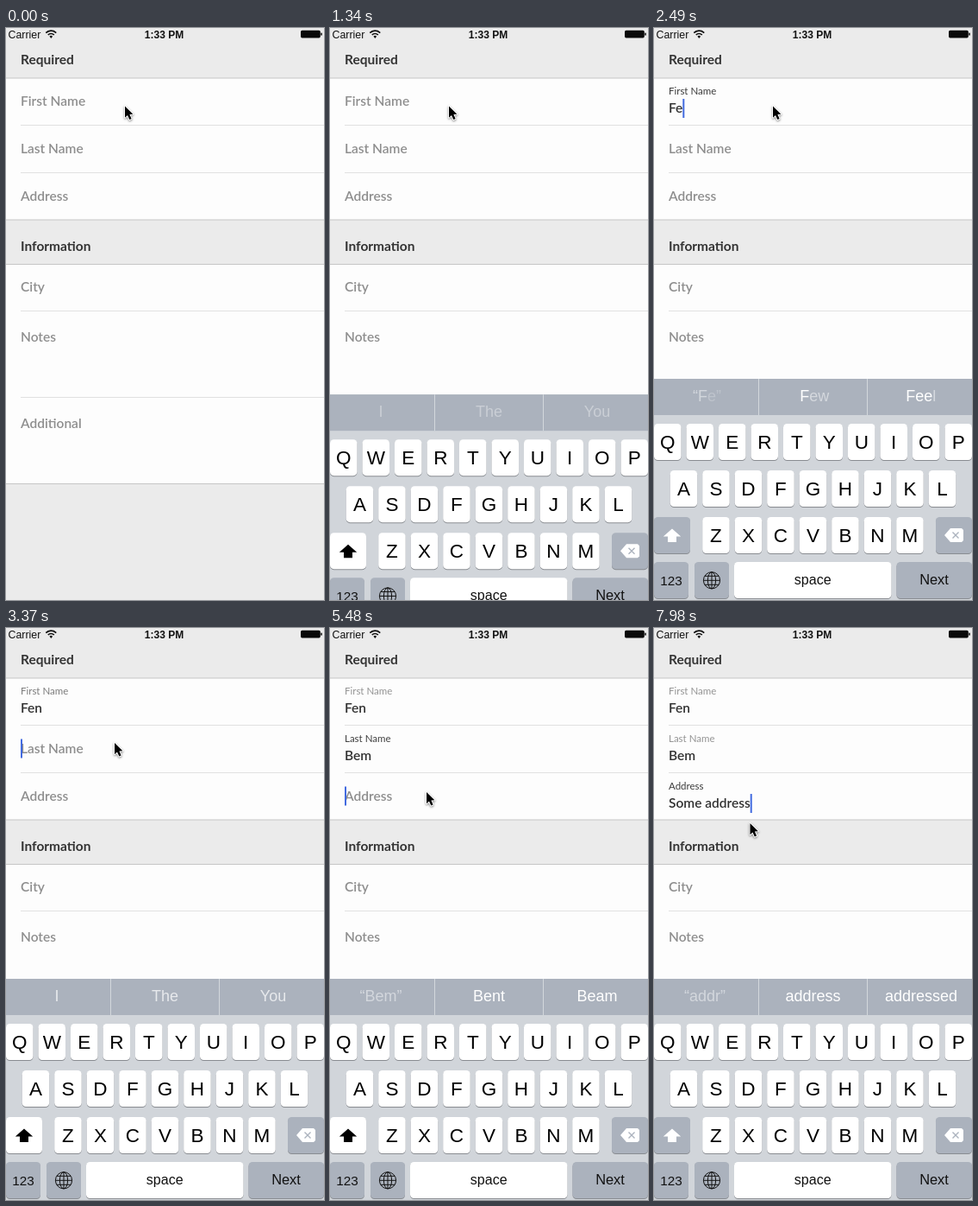
Animation, 369 px wide and 662 px high, one loop 8 s. Source, as an HTML page with a canvas:

```html
<!DOCTYPE html>
<html lang="en">
<head>
<meta charset="utf-8">
<title>Floating label form</title>
<style>
html, body { margin: 0; width: 100%; height: 100%; overflow: hidden; background: #ebebeb; }
canvas { display: block; width: 369px; height: 662px; }
</style>
</head>
<body>
<canvas id="stage"></canvas>
<script>
const W = 369, H = 662, LOOP = 8000;
const canvas = document.getElementById('stage');
const ctx = canvas.getContext('2d');
const dpr = window.devicePixelRatio || 1;
canvas.width = W * dpr;
canvas.height = H * dpr;

const FORM = 'Lato, sans-serif';
const SYS = '"Liberation Sans", Arial, sans-serif';
const STEEL = '#abb2bd';

const fields = [
  { label: 'First Name', y: 85, value: 'Fen', keys: [1870, 2400, 2660], focus: 1440, blur: 3190 },
  { label: 'Last Name', y: 140, value: 'Bem', keys: [3900, 4480, 4770], focus: 3190, blur: 5390 },
  { label: 'Address', y: 195, value: 'Some address', focus: 5390, blur: LOOP,
    keys: [5650, 6100, 6360, 6530, 6910, 7000, 7180, 7350, 7530, 7710, 7800, 7900] },
  { label: 'City', y: 300 },
  { label: 'Notes', y: 358 },
  { label: 'Additional', y: 458 }
];

// Word suggestions: start time, then left, middle and right
const hints = [
  [1250, 'I', 'The', 'You'],
  [1940, '“F”', 'For', 'Feet'],
  [2380, '“Fe”', 'Few', 'Feel'],
  [2720, '“Fen”', 'Fence', 'Fend'],
  [3230, 'I', 'The', 'You'],
  [3980, '“B”', 'By', 'But'],
  [4560, '“Be”', 'Been', 'Best'],
  [4850, '“Bem”', 'Bent', 'Beam'],
  [5430, 'I', 'The', 'You'],
  [5730, '“S”', 'So', 'She'],
  [6130, '“So”', 'So', 'Some'],
  [6380, '“Som”', 'Some', 'Something'],
  [6460, '“Some”', 'Some', 'Sometimes'],
  [6940, 'of', 'people', 'more'],
  [7060, '“a”', 'and', 'are'],
  [7230, '“ad”', 'add', 'address'],
  [7400, '“add”', 'address', 'added'],
  [7600, '“addr”', 'address', 'addressed']
];

// Pointer moves: start, end, destination
const moves = [
  [2930, 3190, 126, 133],
  [5200, 5390, 112, 190],
  [7050, 7420, 111.5, 226]
];

const clamp = v => Math.max(0, Math.min(1, v));
const ease = v => { v = clamp(v); return v * v * (3 - 2 * v); };
const mix = (a, b, p) => a + (b - a) * p;
const grey = v => `rgb(${v},${v},${v})`;

function rect(x, y, w, h, color) {
  ctx.fillStyle = color;
  ctx.fillRect(x, y, w, h);
}

function round(x, y, w, h, r, color) {
  ctx.fillStyle = color;
  ctx.beginPath();
  ctx.roundRect(x, y, w, h, r);
  ctx.fill();
}

function shape(points, color) {
  ctx.fillStyle = color;
  ctx.beginPath();
  points.forEach(([x, y]) => ctx.lineTo(x, y));
  ctx.closePath();
  ctx.fill();
}

function text(str, x, y, font, color, align = 'left') {
  ctx.font = font;
  ctx.fillStyle = color;
  ctx.textAlign = align;
  ctx.fillText(str, x, y);
}

function statusBar() {
  text('Carrier', 2.5, 11.5, `12.4px ${SYS}`, '#111');
  text('1:33 PM', 183.5, 11.5, `bold 12px ${SYS}`, '#111', 'center');
  ctx.strokeStyle = '#111';
  ctx.lineWidth = 1.7;
  for (const r of [4.8, 8.2]) {
    ctx.beginPath();
    ctx.arc(52.3, 11.3, r, -Math.PI * 0.76, -Math.PI * 0.24);
    ctx.stroke();
  }
  ctx.fillStyle = '#111';
  ctx.beginPath();
  ctx.moveTo(52.3, 12);
  ctx.arc(52.3, 11.3, 2.4, -Math.PI * 0.78, -Math.PI * 0.22);
  ctx.fill();
  round(342, 2.8, 22.8, 8.6, 1.6, '#0a0a0a');
  round(365.3, 5.4, 1.5, 3.4, 0.7, '#0a0a0a');
}

function fieldRow(f, t) {
  const bold = `600 15.5px ${FORM}`;
  const typed = f.keys ? f.value.slice(0, f.keys.filter(k => k <= t).length) : '';
  const active = t >= f.focus && t < f.blur;
  if (typed) {
    const p = ease((t - f.keys[0]) / 300);
    ctx.globalAlpha = p;
    text(f.label, 17, f.y - 8 + 8 * (1 - p), `11.5px ${FORM}`,
      grey(Math.round(mix(60, 148, clamp((t - f.blur) / 250)))));
    ctx.globalAlpha = 1;
    text(typed, 17, f.y + 13, bold, '#303030');
  } else {
    text(f.label, 17, f.y + 5.3, bold, '#8e8e8e');
  }
  if (active) {
    ctx.font = bold;
    const x = 17 + ctx.measureText(typed).width;
    rect(x, f.y + (typed ? -3 : -11.5), 2, 22, '#426be0');
  }
}

function form(t) {
  rect(0, 0, W, H, '#ebebeb');
  rect(0, 58, W, 164, '#fdfdfd');
  rect(0, 273, W, 254, '#fdfdfd');
  for (const y of [57.5, 221.5, 273, 527]) rect(0, y, W, 1, '#c6c6c6');
  for (const y of [112, 167, 327, 427]) rect(17, y, W - 17, 1, '#e1e1e1');
  const bold = `700 15.5px ${FORM}`;
  text('Required', 17, 42.2, bold, '#333');
  text('Information', 17, 257.7, bold, '#333');
  fields.forEach(f => fieldRow(f, t));
}

// Keeps the shared beginning of two words while the endings cross-fade
function morph(from, to, cx, y, p) {
  const quoted = to[0] === '“';
  const color = quoted ? '#d3d7dd' : '#fff';
  const font = `18px ${SYS}`;
  ctx.font = font;
  const width = s => ctx.measureText(s).width;
  let n = 0;
  while (n < from.length && n < to.length && from[n] === to[n]) n++;
  const x = mix(cx - width(from) / 2, cx - width(to) / 2, n ? p : 1);
  const stem = to.slice(0, n);
  const tail = x + width(stem);
  text(stem, x, y, font, color);
  ctx.globalAlpha = clamp(1 - p * 2);
  text(from.slice(n), n ? tail : cx - width(from) / 2, y, font, color);
  ctx.globalAlpha = p;
  text(to.slice(n), tail, y, font, color);
  ctx.globalAlpha = 1;
}

function suggestions(t, top) {
  rect(0, top, W, 42, STEEL);
  for (const x of [121, 247]) rect(x, top, 1, 42, '#d3d7dc');
  const i = hints.filter(h => h[0] <= t).length - 1;
  if (i < 0) return;
  const p = ease((t - hints[i][0]) / 220);
  [59, 184.5, 310].forEach((cx, k) =>
    morph(i ? hints[i - 1][k + 1] : '', hints[i][k + 1], cx, top + 26, p));
}

function key(x, y, w, color = '#fff') {
  round(x, y + 1, w, 42, 4.5, '#898c91');
  round(x, y, w, 42, 4.5, color);
}

function shiftKey(y, on) {
  key(0, y, 42, on ? '#fff' : STEEL);
  shape([[21, 13.5], [31.2, 22.5], [26, 22.5], [26, 29], [16, 29], [16, 22.5], [10.8, 22.5]]
    .map(([px, py]) => [px, y + py]), on ? '#000' : '#fff');
}

function deleteKey(y) {
  key(327, y, 42, STEEL);
  shape([[337, 21], [344, 13], [357, 13], [359, 15], [359, 27], [357, 29], [344, 29]]
    .map(([px, py]) => [px, y + py]), '#fff');
  ctx.strokeStyle = STEEL;
  ctx.lineWidth = 1.4;
  ctx.beginPath();
  for (const s of [-1, 1]) {
    ctx.moveTo(346.5, y + 21 - 3.5 * s);
    ctx.lineTo(353.5, y + 21 + 3.5 * s);
  }
  ctx.stroke();
}

function globe(cx, cy) {
  ctx.strokeStyle = '#111';
  ctx.lineWidth = 1;
  const r = 9.6;
  for (const rx of [r, r * 0.48]) {
    ctx.beginPath();
    ctx.ellipse(cx, cy, rx, r, 0, 0, 7);
    ctx.stroke();
  }
  ctx.beginPath();
  ctx.moveTo(cx, cy - r);
  ctx.lineTo(cx, cy + r);
  for (const [dy, half] of [[-5, 8.2], [0, r], [5, 8.2]]) {
    ctx.moveTo(cx - half, cy + dy);
    ctx.lineTo(cx + half, cy + dy);
  }
  ctx.stroke();
}

function keyboard(t) {
  if (t < 1158) return;
  // Critically damped slide
  const u = (t - 1128) * 0.0203;
  const top = 406 + 256 * (1 + u) * Math.exp(-u);
  rect(0, top, W, H, '#d1d5da');
  suggestions(t, top);
  const rows = [['QWERTYUIOP', 0, 52], ['ASDFGHJKL', 18.7, 106], ['ZXCVBNM', 56.2, 160]];
  for (const [letters, x0, dy] of rows) {
    [...letters].forEach((c, i) => {
      const x = x0 + i * 37.5;
      key(x, top + dy, 31.5);
      text(c, x + 15.75, top + dy + 29.3, `22.5px ${SYS}`, '#000', 'center');
    });
  }
  const shift = fields.some(f => f.keys && t >= f.focus && t < f.keys[0]) || t < 1440;
  shiftKey(top + 160, shift);
  deleteKey(top + 160);
  const y = top + 212;
  key(0, y, 40, STEEL);
  key(47, y, 40, STEEL);
  key(93, y, 182.5);
  key(281.5, y, 87.5, STEEL);
  text('123', 20, y + 27, `15.3px ${SYS}`, '#111', 'center');
  globe(67, y + 21.3);
  text('space', 184.2, y + 26, `16px ${SYS}`, '#111', 'center');
  text('Next', 325, y + 26, `16.4px ${SYS}`, '#111', 'center');
}

function pointer(t) {
  let x = 138, y = 90.5;
  for (const [a, b, tx, ty] of moves) {
    const p = ease((t - a) / (b - a));
    x = mix(x, tx, p);
    y = mix(y, ty, p);
  }
  ctx.save();
  ctx.translate(x, y);
  const arrow = [[0, 0], [0, 13.2], [3, 10.4], [5.3, 15.6], [7.6, 14.6], [5.4, 9.5], [9.4, 9.3]];
  ctx.lineJoin = 'round';
  ctx.shadowColor = 'rgba(0,0,0,.4)';
  ctx.shadowBlur = 2.5 * dpr;
  ctx.shadowOffsetY = dpr;
  shape(arrow, '#fff');
  ctx.strokeStyle = '#fff';
  ctx.lineWidth = 2;
  ctx.stroke();
  ctx.shadowColor = 'transparent';
  shape(arrow, '#000');
  ctx.restore();
}

function draw(t) {
  ctx.setTransform(dpr, 0, 0, dpr, 0, 0);
  form(t);
  statusBar();
  keyboard(t);
  pointer(t);
}

const STEP = 88.3, FIRST = 1158;
function tick() {
  const t = performance.now() % LOOP;
  const n = Math.floor((t - FIRST) / STEP);
  draw(t < 1165 ? 0 : FIRST + n * STEP + 6);
  requestAnimationFrame(tick);
}
tick();
</script>
</body>
</html>
```
